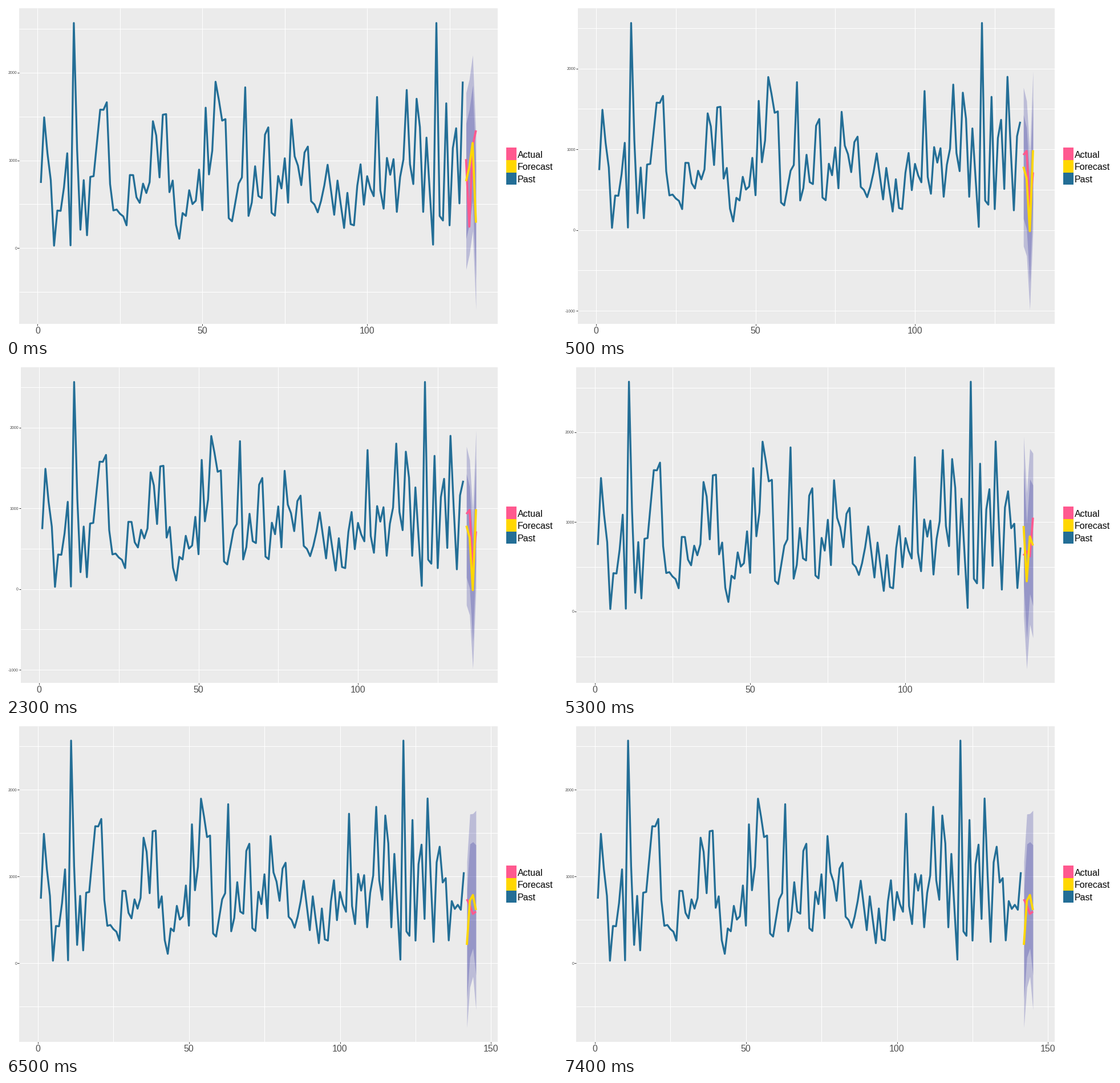
Recreate the animation shown at these times as a matplotlib script. Size 966 by 580 pixels, loop 8 s.

```python
import numpy as np
import matplotlib.pyplot as plt
from matplotlib.animation import FuncAnimation
from matplotlib.patches import Rectangle

W, H, DPI = 966, 580, 100
PX = 72 / DPI  # one pixel in points
TOP, BOTTOM, RIGHT = 4, 557, 862
PINK, GOLD, BLUE = "#FF598F", "#FFD700", "#236E96"
NAVY, GREY, DARK = "#00008B", "#4D4D4D", "#333333"
HORIZON = 4
INNER = 1.2816 / 1.96  # 80 % band relative to the 95 % band

SERIES = np.array([
    743, 1490, 1080, 775, 28, 428, 425, 691, 1081, 32,
    2565, 1120, 210, 775, 147, 812, 820, 1198, 1578, 1576,
    1662, 730, 430, 440, 392, 362, 260, 833, 832, 580,
    516, 735, 628, 752, 1446, 1284, 806, 1520, 1527, 638,
    770, 265, 107, 400, 367, 660, 502, 540, 895, 432,
    1600, 840, 1110, 1896, 1690, 1453, 1470, 342, 306, 520,
    735, 806, 1832, 367, 520, 933, 594, 570, 1293, 1376,
    403, 370, 822, 680, 1024, 518, 1465, 1046, 940, 718,
    1090, 1157, 535, 497, 408, 537, 715, 950, 665, 380,
    770, 495, 230, 630, 273, 260, 710, 955, 495, 820,
    678, 592, 1722, 658, 450, 1028, 836, 1014, 413, 810,
    1010, 1802, 955, 730, 1702, 1380, 413, 1259, 640, 40,
    2565, 366, 315, 1650, 260, 1140, 1366, 510, 1898, 1015,
    245, 1162, 1342, 930, 980, 262, 715, 625, 672, 615,
    1048, 737, 665, 568, 595,
])

# start frame, panel left, past length, pixel row of zero, pixels per unit,
# forecast means, half widths of the 95 % band
STAGES = [
    (0, 23, 129, 424.3, .1538, (763, 925, 1198, 290), (1007, 1000, 1002, 990)),
    (1, 25.5, 133, 392.7, .1415, (785, 640, -12, 990), (982, 960, 975, 980)),
    (7, 23, 137, 432.0, .1570, (955, 338, 838, 737), (1000, 981, 980, 1030)),
    (13, 23, 141, 419.0, .1520, (210, 720, 785, 612), (955, 998, 938, 1148)),
]

fig = plt.figure(figsize=(W / DPI, H / DPI), dpi=DPI, facecolor="white")
ax = fig.add_axes([0, 0, 1, 1])


def line(x, y, color, width, z):
    ax.plot(x, y, color=color, lw=width * PX, zorder=z,
            solid_capstyle="butt", solid_joinstyle="round")


def label(x, y, text, size, color, ha):
    ax.text(x, y, text, fontsize=size * PX, color=color, ha=ha,
            va="baseline", family="Liberation Sans")


def box(x, y, w, h, color):
    ax.add_patch(Rectangle((x, y), w, h, fc=color, ec="none", lw=0, zorder=0))


def draw_legend():
    entries = (("Actual", PINK), ("Forecast", GOLD), ("Past", BLUE))
    for i, (name, color) in enumerate(entries):
        y = 248.4 + 21.6 * i
        box(877, y, 18, 21.6, color)
        label(897, y + 17.3, name, 16, "black", "left")


def draw_grid(left, to_x, to_y):
    for v in range(0, 151, 25):
        x = to_x(v)
        if x > RIGHT:
            continue
        line([x, x], [TOP, BOTTOM], "white", 1, 1)
        if v % 50 == 0:
            line([x, x], [BOTTOM, BOTTOM + 3], DARK, 1, 1)
            label(x, 574.5, str(v), 16, GREY, "center")
    for v in range(-1000, 2501, 500):
        y = to_y(v)
        if not TOP < y < BOTTOM:
            continue
        line([left, RIGHT], [y, y], "white", 1, 1)
        if v % 1000 == 0:
            line([left - 3, left], [y, y], DARK, 1, 1)
            label(left - 3.5, y + 2.5, str(v), 7, GREY, "right")


def draw(frame):
    _, left, n, zero, scale, mean, half = [s for s in STAGES if s[0] <= frame][-1]
    mean, half = np.array(mean), np.array(half)
    span = n + HORIZON - 1
    step = (RIGHT - left) / (1.1 * span)  # 5 % margin on both sides

    def to_x(v):
        return left + (v - 1 + 0.05 * span) * step

    def to_y(v):
        return zero - v * scale

    ax.clear()
    ax.set(xlim=(0, W), ylim=(H, 0))
    ax.axis("off")
    box(left, TOP, RIGHT - left, BOTTOM - TOP, "#EBEBEB")
    draw_grid(left, to_x, to_y)
    draw_legend()

    past = np.arange(1, n + 1)
    ahead = np.arange(n + 1, n + HORIZON + 1)
    for k in (1, INNER):
        ax.fill_between(to_x(ahead), to_y(mean + k * half), to_y(mean - k * half),
                        color=NAVY, alpha=0.2, lw=0, antialiased=False, zorder=2)
    line(to_x(past), to_y(SERIES[:n]), BLUE, 3.3, 3)
    line(to_x(ahead), to_y(SERIES[n:n + HORIZON]), PINK, 3.8, 4)
    line(to_x(ahead), to_y(mean), GOLD, 3.8, 5)
    return []


anim = FuncAnimation(fig, draw, frames=16, interval=500, repeat=True,
                     repeat_delay=0, blit=False)
plt.show()
```
